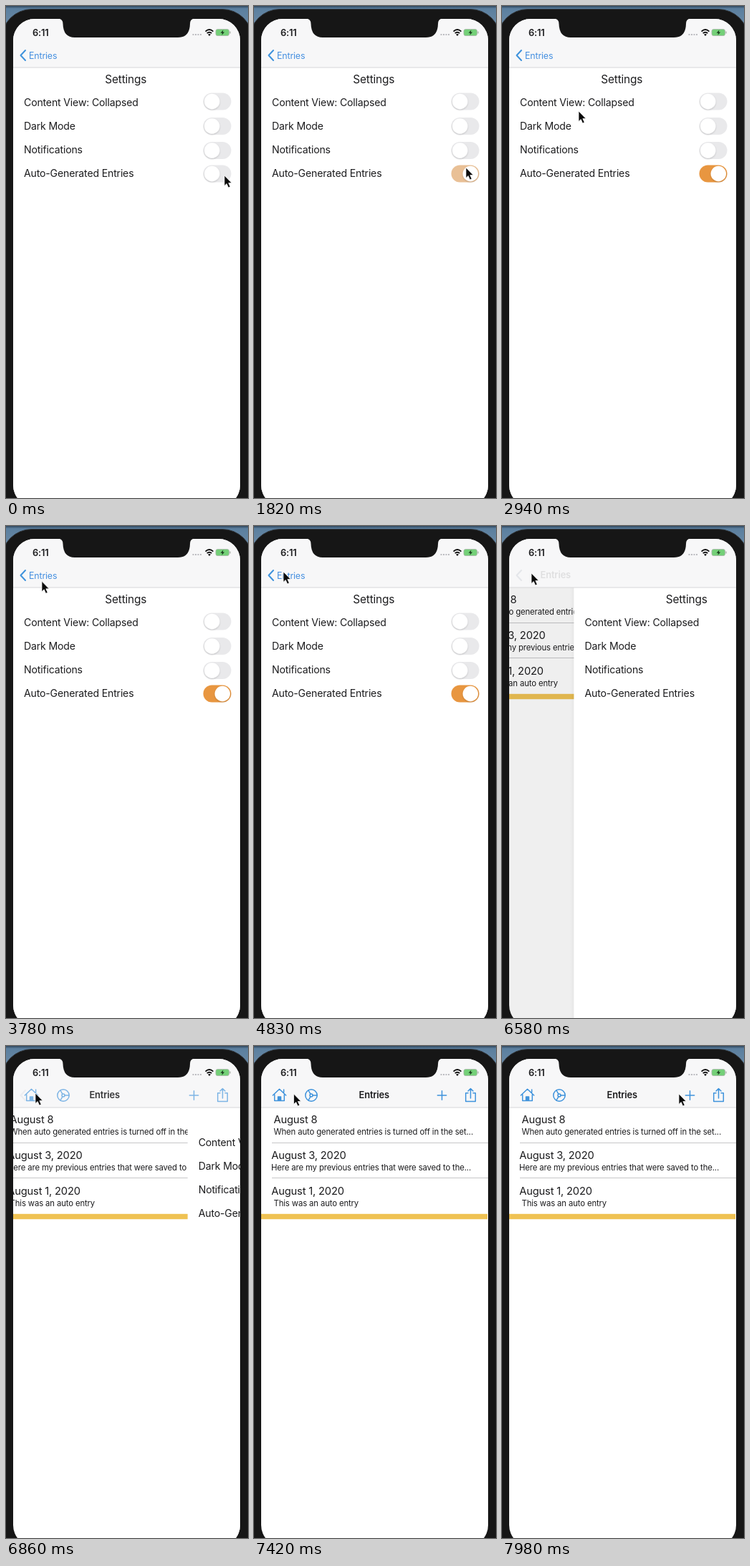
Write an HTML page that moves like this. It is 338x688 px and loops after 8000 ms.

```html
<!DOCTYPE html>
<html lang="en">
<head>
<meta charset="utf-8">
<title>Settings toggle</title>
<style>
  html, body { margin: 0; width: 100%; height: 100%; overflow: hidden; background: #161616; }
  svg { display: block; width: 338px; height: 688px; }
  text { font-family: Inter, "Liberation Sans", Arial, sans-serif; letter-spacing: -.012em; fill: #1c1c1e; }
  .row { font-size: 14.1px; }
  .head { font-size: 15.4px; }
  .day { font-size: 14.7px; }
  .note { font-size: 11.35px; }
  .bar { font-size: 12.4px; }
  .bold { font-size: 12.9px; font-weight: 600; }
  .line { fill: none; stroke: #3f93dc; stroke-width: 1.5; stroke-linecap: round; stroke-linejoin: round; }
  .rule { stroke: #c6c6c8; stroke-width: 1; }
</style>
</head>
<body>
<svg viewBox="0 0 338 688">
  <defs>
    <linearGradient id="desk" x2="0" y2="1">
      <stop offset="0" stop-color="#2f465c"/>
      <stop offset=".12" stop-color="#5b7f9f"/>
      <stop offset="1" stop-color="#6b8ba6"/>
    </linearGradient>
    <linearGradient id="edge">
      <stop offset="0" stop-color="#000" stop-opacity="0"/>
      <stop offset="1" stop-color="#000" stop-opacity=".06"/>
    </linearGradient>
    <clipPath id="screen"><rect x="10" y="18" width="317" height="682" rx="30"/></clipPath>
    <filter id="soft" x="-30%" y="-30%" width="160%" height="160%">
      <feDropShadow dx="0" dy="1" stdDeviation="1" flood-opacity=".2"/>
    </filter>
  </defs>

  <rect width="338" height="30" fill="url(#desk)"/>
  <rect x="-6" y="4.5" width="350" height="720" rx="42" fill="#161616" stroke="#303438"/>

  <g clip-path="url(#screen)">
    <rect x="10" y="18" width="317" height="670" fill="#fff"/>
    <g id="list">
      <path class="rule" d="M25 135.5H327M25 184.5H327"/>
      <rect x="10" y="234.8" width="316" height="7.4" fill="#efc253"/>
    </g>
    <rect id="dim" x="10" y="86" width="317" height="602"/>
    <g id="page">
      <rect id="shade" x="4" y="86" width="6" height="602" fill="url(#edge)"/>
      <rect x="10" y="86" width="317" height="602" fill="#fff"/>
    </g>

    <rect x="10" y="18" width="317" height="68" fill="#f7f7f8"/>
    <path d="M10 86H327" stroke="#d6d6d8"/>
    <path id="chevron" class="line" style="stroke-width:2" d="M27 62L20.5 69L27 76"/>
    <text id="back" class="bar" x="32" y="73.5" style="fill:#4590e0">Entries</text>
    <text id="title" class="bold" x="146.5" y="73.4">Entries</text>
    <g id="icons" class="line">
      <path d="M26.3 69L35.5 60.2L44.7 69M28.7 67.5V76.5H42.3V67.5M41.6 61V65"/>
      <path d="M33.5 76V71H37.5V76Z" fill="#3f93dc"/>
      <circle cx="80" cy="69" r="8.2"/>
      <circle cx="80" cy="69" r="2"/>
      <path d="M82 69H88M79 67.3L76 62M79 70.7L76 76"/>
      <path d="M262.5 62.8V75.2M256.3 69H268.7"/>
      <path d="M299 65.8H295.7V77.5H309.3V65.8H306M302.5 73V59.8M299 63L302.5 59.5L306 63"/>
    </g>

    <text class="bold" x="37" y="41.8">6:11</text>
    <path d="M260.5 40H273" stroke="#bcbcc0" stroke-width="2" stroke-dasharray="2 1.5"/>
    <g fill="none" stroke="#111" stroke-width="1.9">
      <path d="M278.6 35.6Q284 30.6 289.4 35.6M280.7 38.1Q284 35.2 287.3 38.1"/>
      <path d="M284 42L282 39.8Q284 38.2 286 39.8Z" fill="#111" stroke="none"/>
    </g>
    <rect x="293" y="32.5" width="18.5" height="9" rx="2.6" fill="#74d078" stroke="#a9b5aa" stroke-width=".8"/>
    <path d="M313 35.5V38.5" stroke="#a0a8a0" stroke-width="1.2"/>
    <path d="M303.4 33.4L299.6 37.7H302L301.4 40.8L305.2 36.4H302.8Z" fill="#183a1c"/>
  </g>

  <path fill="#161616" d="M73 17.5Q79.5 18 79.5 25Q80 44 96 44H240Q256.5 44 257 25Q257 18 263 17.5Z"/>
  <path id="cursor" fill="#0a0a0a" stroke="#fff" stroke-width=".7"
        d="M0 0V14.4L3.2 11.5L5.6 16.9L8.2 15.8L5.8 10.5H10.2Z"/>
</svg>

<script>
const LOOP = 8000, STEP = 70, WIDTH = 317;
const $ = id => document.getElementById(id);

function add(parent, tag, attrs, text = "") {
  const el = document.createElementNS("http://www.w3.org/2000/svg", tag);
  for (const key in attrs) el.setAttribute(key, attrs[key]);
  el.textContent = text;
  return parent.appendChild(el);
}

const list = $("list"), page = $("page");
const label = (parent, cls, x, y, text) => add(parent, "text", { class: cls, x, y }, text);

[
  [27.5, 27.5, 108, "August 8", "When auto generated entries is turned off in the set..."],
  [24.3, 24, 158, "August 3, 2020", "Here are my previous entries that were saved to the..."],
  [24.3, 27.5, 207.5, "August 1, 2020", "This was an auto entry"]
].forEach(([x, noteX, y, day, note]) => {
  label(list, "day", x, y, day);
  label(list, "note", noteX, y + 16.3, note);
});

label(page, "head", 138.3, 108.3, "Settings");
const switches = [
  ["Content View: Collapsed", 139.5, 133.5],
  ["Dark Mode", 172.7, 168],
  ["Notifications", 206.3, 202],
  ["Auto-Generated Entries", 238.5, 234.5]
].map(([name, baseline, y]) => {
  label(page, "row", 25, baseline, name);
  const track = add(page, "rect", { x: 275.5, y: y - 12, width: 39, height: 24, rx: 12, fill: "#e9e9eb" });
  const knob = add(page, "circle", { cx: 287.7, cy: y, r: 10.7, fill: "#fff", filter: "url(#soft)" });
  return { track, knob };
});
const auto = switches[3];

// Each entry is a time followed by one or more values.
const pointer = [
  [0, 305, 237], [140, 304, 235], [350, 299, 229], [560, 296, 226],
  [2170, 296, 226], [2450, 250, 209], [2700, 175, 178], [2940, 107, 147],
  [3220, 66, 98], [3500, 52, 80], [4340, 46, 72], [4830, 41, 64],
  [5600, 41, 64], [6020, 41, 66], [7350, 41, 66], [7490, 70, 68],
  [7700, 168, 70], [7910, 243, 67], [7980, 247, 67]
];
const slide = [[0, 0], [1680, 0], [1820, 1]];
const tint = [[0, 0], [1680, 0], [1820, .5], [1960, .88], [2100, 1]];
const backFade = [[0, 1], [6230, 1], [6300, .4], [6370, .1], [6440, 0]];
const chevronFade = [[0, 1], [6230, 1], [6300, .5], [6370, .28], [6860, .12], [7140, 0]];

function at(table, t) {
  const next = table.findIndex(k => k[0] > t);
  if (next < 0) return table.at(-1).slice(1);
  const a = table[next - 1], b = table[next];
  const f = (t - a[0]) / (b[0] - a[0]);
  return a.slice(1).map((v, i) => v + (b[i + 1] - v) * f);
}

function bezier(x, x1, y1, x2, y2) {
  const curve = (s, p, q) => 3 * s * (1 - s) ** 2 * p + 3 * s * s * (1 - s) * q + s ** 3;
  let lo = 0, hi = 1;
  for (let i = 0; i < 24; i++) {
    const mid = (lo + hi) / 2;
    if (curve(mid, x1, x2) < x) lo = mid; else hi = mid;
  }
  return curve(lo, y1, y2);
}

const clamp = v => Math.min(1, Math.max(0, v));
const mix = (a, b, f) => `rgb(${a.map((v, i) => Math.round(v + (b[i] - v) * f))})`;
const move = (el, x, y = 0) => el.setAttribute("transform", `translate(${x} ${y})`);
const fade = (el, v) => el.setAttribute("opacity", v);

function render(t) {
  const pop = bezier(clamp((t - 6300) / 860), .4, .13, .6, 1);
  const shade = clamp(1 - 1.35 * pop);
  move(page, WIDTH * pop);
  move(list, -.3 * WIDTH * (1 - pop));
  fade($("dim"), .1 * shade);
  fade($("shade"), shade);

  move($("title"), -130 * (1 - pop));
  fade($("title"), clamp(pop * 1.6 - .35));
  fade($("icons"), clamp(pop * 1.5 - .5));
  fade($("back"), at(backFade, t)[0]);
  fade($("chevron"), at(chevronFade, t)[0]);
  $("chevron").style.stroke = t >= 6300 ? "#9aa7b4" : "#3f93dc";

  auto.knob.setAttribute("cx", 287.7 + 14.6 * at(slide, t)[0]);
  auto.track.setAttribute("fill", mix([233, 233, 235], [232, 150, 64], at(tint, t)[0]));
  move($("cursor"), ...at(pointer, t));
}

const start = performance.now();
function tick() {
  const t = (performance.now() - start) % LOOP;
  render(Math.floor(t / STEP) * STEP);
  requestAnimationFrame(tick);
}
tick();
</script>
</body>
</html>
```
